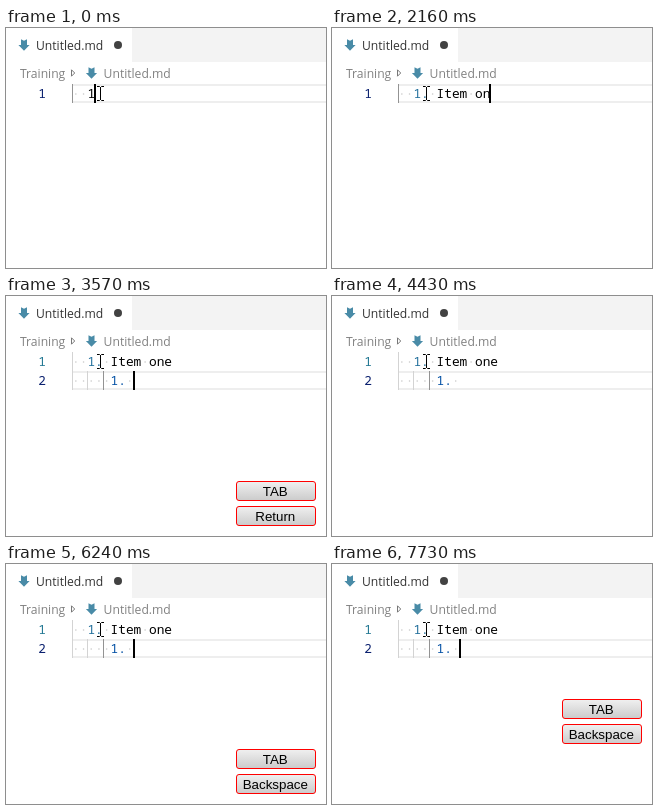
An HTML page for the animation above (7990 ms loop, 320 by 240 pixels).

```html
<!DOCTYPE html>
<html lang="en">
<head>
<meta charset="utf-8">
<title>Markdown list editing</title>
<style>
  html, body { margin: 0; width: 100%; height: 100%; overflow: hidden; background: #fff; }
  svg { display: block; width: 320px; height: 240px; }
  text { white-space: pre; }
  .ui { font: 12.15px "Open Sans", "Noto Sans", sans-serif; fill: #333; }
  .crumb { fill: #818181; }
  .code { font: 12.83px "Noto Sans Mono", "DejaVu Sans Mono", monospace; font-variant-ligatures: none; }
  .key { font: 13.33px "Liberation Sans", Arial, sans-serif; text-anchor: middle; }
</style>
</head>
<body>
<svg viewBox="0 0 320 240">
  <defs>
    <linearGradient id="face" x2="0" y2="1">
      <stop offset="0" stop-color="#f0f0f0"/>
      <stop offset="1" stop-color="#cbcbcb"/>
    </linearGradient>
    <path id="arrow" d="M-3-5.7L0-4.3L3-5.7V0H5.6L0 5.8L-5.6 0H-3Z" fill="#498ba7"/>
  </defs>
  <rect width="320" height="240" fill="#fff"/>
  <rect x="126" width="194" height="34" fill="#f3f3f3"/>
  <use href="#arrow" x="18" y="17"/>
  <text class="ui" x="30" y="21.5">Untitled.md</text>
  <circle cx="112" cy="17" r="4" fill="#424242"/>
  <text class="ui crumb" x="14" y="49.5">Training</text>
  <path d="M65.5 41.8L68.7 45L65.5 48.2Z" fill="none" stroke="#777"/>
  <use href="#arrow" x="85.5" y="45"/>
  <text class="ui crumb" x="97.6" y="49.5">Untitled.md</text>
  <g id="editor"></g>
  <path d="M91 58.5H93.5L94.5 59.5L95.5 58.5H98M94.5 59V72M91 72.5H93.5L94.5 71.5L95.5 72.5H98"
        fill="none" stroke="#000"/>
  <g id="keys"></g>
</svg>
<script>
const LOOP = 7990, LEFT = 66, CHAR = 7.697, TOP = 56, LINE = 19;
const ACTIVE = "#939393", GUIDE = "#d3d3d3";
const FIRST = "  1. Item one", ITEM = "  2. ", NESTED = "     1. ";

// [time, number of characters on the first line]
const typing = [[0, 3], [460, 4], [720, 5], [1180, 6], [1370, 7], [1490, 8], [1670, 9],
  [1860, 10], [1980, 11], [2160, 12], [2350, 13]];
// [time, second line]
const second = [[0, null], [2860, ITEM], [3510, NESTED], [5540, ITEM],
  [6120, NESTED], [7090, ITEM], [7670, NESTED]];
const caretOff = [[4100, 4490], [5150, 5540], [6700, 7090]];
// [label, top, from, to]
const presses = [
  ["Return", 210, 2800, 3770],
  ["TAB", 185, 3450, 4430],
  ["Backspace", 210, 5480, 6440],
  ["TAB", 185, 6060, 7030],
  ["Backspace", 160, 7030, LOOP],
  ["TAB", 135, 7610, LOOP]
];

const at = (steps, t) => steps.filter(s => s[0] <= t).pop()[1];
const colX = col => LEFT + col * CHAR;
const rect = (x, y, w, h, fill) =>
  `<rect x="${x}" y="${y}" width="${w}" height="${h}" fill="${fill}"/>`;
const code = (x, y, fill, s) =>
  `<text class="code" x="${x}" y="${y}" fill="${fill}">${s}</text>`;

function drawLine(index, text, current, caret, markerColor) {
  const y = TOP + index * LINE, base = y + 14;
  const indent = text.search(/\S/), levels = Math.ceil(indent / 2);
  const depth = current ? levels - 1 : -1;
  let out = "";
  if (current) {
    out += rect(66, y, 254, 2, "#eee") + rect(66, y + LINE - 2, 254, 2, "#eee");
  }
  for (let i = 0; i < levels; i++) {
    out += rect(Math.round(colX(i * 2)), y, 1, LINE, i === depth ? ACTIVE : GUIDE);
  }
  out += code(32.2, base, current ? "#0b216f" : "#237893", index + 1);
  [...text].forEach((c, i) => {
    if (c === " ") out += `<circle cx="${colX(i + .5)}" cy="${y + 10}" r=".8" fill="#333" opacity=".27"/>`;
  });
  const marker = /^\s*\d\. /.test(text) ? 2 : 0;
  if (marker) out += code(colX(indent), base, markerColor, text.substr(indent, 2));
  const body = text.slice(indent + marker), lead = body.length - body.trimStart().length;
  out += code(colX(indent + marker + lead), base, "#000", body.trim());
  if (current && caret) out += rect(Math.floor(colX(text.length) - .5), y, 2, LINE, "#000");
  return out;
}

function drawKey([label, y]) {
  return `<rect x="230.5" y="${y + .5}" width="79" height="19" rx="2.5" fill="url(#face)" stroke="#f00"/>` +
    `<text class="key" x="269.3" y="${y + 15}">${label}</text>`;
}

const editor = document.getElementById("editor"), keys = document.getElementById("keys");
let shown = "";

function render() {
  const t = performance.now() % LOOP;
  const first = FIRST.slice(0, at(typing, t)), next = at(second, t);
  const caret = !caretOff.some(([a, b]) => t >= a && t < b);
  const held = presses.filter(p => t >= p[2] && t < p[3]);
  const state = [first, next, caret, held].join("|");
  if (state !== shown) {
    shown = state;
    editor.innerHTML = drawLine(0, first, !next, caret, "#23709c") +
      (next ? drawLine(1, next, true, caret, "#0451a5") : "");
    keys.innerHTML = held.map(drawKey).join("");
  }
  requestAnimationFrame(render);
}
render();
</script>
</body>
</html>
```
